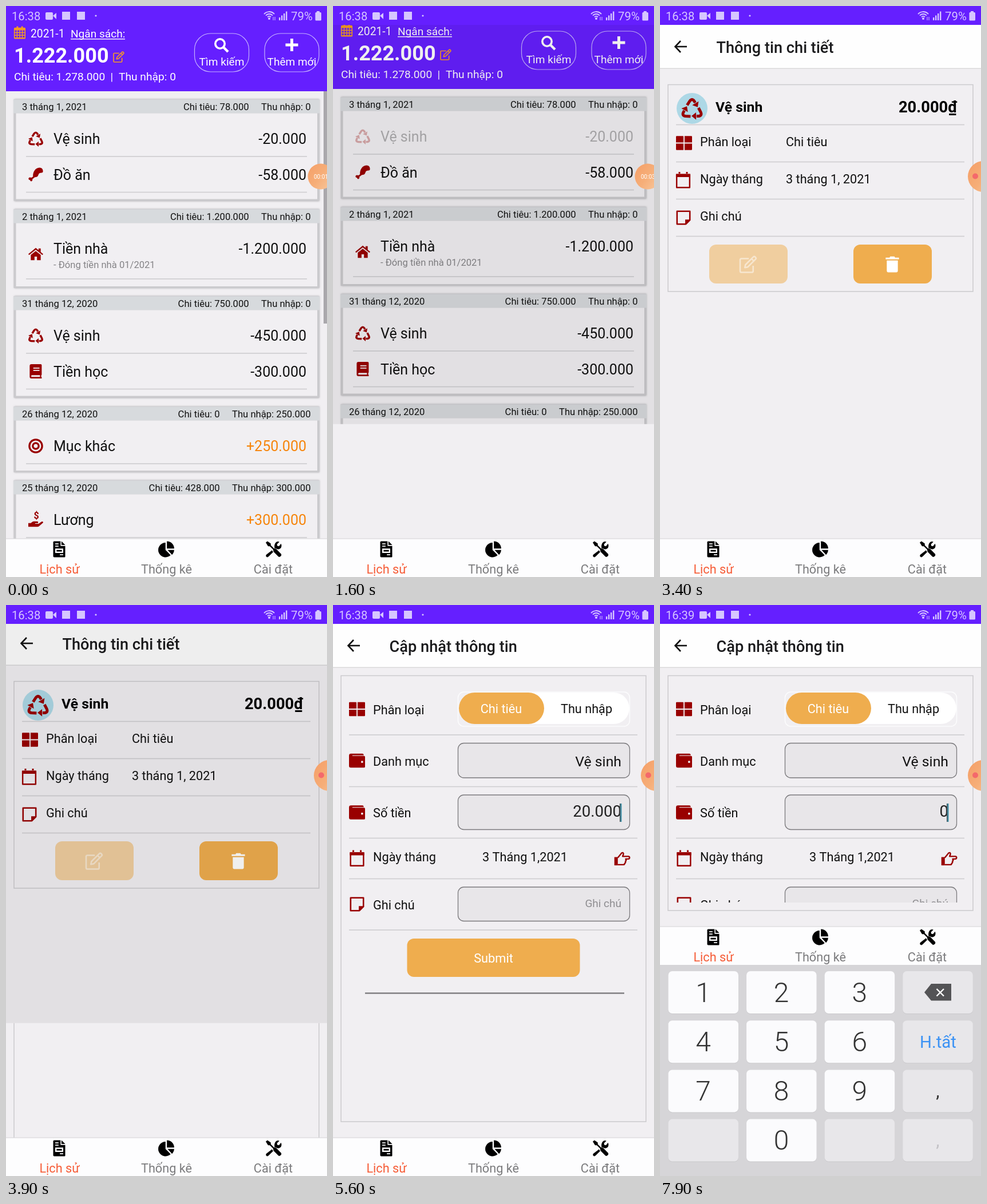
Write an HTML page with a canvas that moves like this. It is 561 px wide and 998 px high and loops after 8000 ms.

```html
<!DOCTYPE html>
<html lang="vi">
<head>
<meta charset="utf-8">
<title>Sổ chi tiêu</title>
<style>
html, body { margin: 0; width: 100%; height: 100%; overflow: hidden; background: #f1eff2; }
canvas { display: block; width: 100vw; height: 100vh; }
</style>
</head>
<body>
<canvas id="stage"></canvas>
<script>
const W = 561, H = 998, LOOP = 8000;
const BAR = 33, SCREEN_H = 898, KEYS_H = 369;
const BG = '#f1eff2', PURPLE = '#651fff', RED = '#990000', ORANGE = '#efad4e', LINE = '#cecdd0', LILAC = '#d6c6ff';

const canvas = document.getElementById('stage');
const c = canvas.getContext('2d');
const scale = window.devicePixelRatio || 1;
canvas.width = W * scale;
canvas.height = H * scale;

// Icons on a 24-unit grid: [filled path, stroked path, stroke width]
const arm = (a, b, d) => ({ a, b, d });
const ICONS = {
  drumstick: ['M7.6 15.4C7 9 11 1 18 1C22 1 24 4 23.6 7.5C23 9.6 20.6 9 18.6 9.6C15.6 10.6 17 14.6 13.4 16C11.6 16.7 10.2 16.2 9.4 17.2L6.6 19.4C7.4 22 5 24 3.4 22.4C3 22 2.9 21.4 2.8 21C.6 21 -.4 18.6 1 17.4C2.2 16.4 3.6 16.6 4.6 17.4Z'],
  home: ['M12 1.6L16.5 5.4V2.6H20V8.2L24 11.6L22.7 13.2L12 4.7L1.3 13.2L0 11.6ZM12 6.6L20 13V21.4H14V15.6H10V21.4H4V13Z'],
  book: ['M5 .5H20Q21.6 .5 21.6 2V17Q21.6 18 20.8 18.4V21.2H21.6V23.5H5Q2.2 23.5 2.2 20.5V3.5Q2.2 .5 5 .5ZM8 6V7.6H18V6ZM8 9.6V11.2H18V9.6ZM6 18.2Q4.6 18.2 4.6 19.6Q4.6 21 6 21H18.8V18.2Z'],
  target: ['', 'M1.7 12A10.3 10.3 0 1 0 22.3 12A10.3 10.3 0 1 0 1.7 12ZM7.2 12A4.8 4.8 0 1 0 16.8 12A4.8 4.8 0 1 0 7.2 12Z', 3],
  hand: ['M0 17.2H4L6.4 15.4Q7.6 14.6 9 14.6H14.6Q16.4 15 15.8 16.8Q15.4 17.6 14.4 17.6H11V18.4H16.4L21 15.2Q23 14.2 24 16Q24 16.8 23.2 17.4L17 22.6Q16.2 23.2 15 23.2H0Z'],
  file: ['M4.5 0H14V7H21V23Q21 24 20 24H4.5Q3 24 3 22.5V1.5Q3 0 4.5 0ZM15.4 0L21 5.6H15.4ZM6 3.2V4.8H11V3.2ZM6 6.6V8.2H11V6.6ZM6 11V17.5H18V11ZM8 13H16V15.5H8ZM13 19.5V21H18V19.5Z'],
  pie: ['M11 13L18.4 20.4A10.5 10.5 0 1 1 11 2.5ZM13 11V.5A10.5 10.5 0 0 1 23.5 11ZM14 13H23.5A10.5 10.5 0 0 1 20.4 20Z'],
  tools: ['M0 2L2.5 0L7.5 3.4V6L12.2 10.8L15.4 11.4L23 19Q24 20.6 22.8 22L21.4 23.2Q20 24 18.6 22.8L11.6 15.6L11 12.4L6 7.5H3.4ZM22.8 3.6Q25 8 21.6 11Q18.6 13 15.5 11L13 10.4V8.4Q12.6 4.6 15.4 1.6Q17.6 -.2 20.4 .9L16.8 4.6L17.3 7.1L19.8 7.4ZM9.4 13.4L1 20Q-.6 22 1 23.4Q2.6 24.6 4.2 23L11 16.2Z'],
  month: ['M3 2.5H6V0H9V2.5H15V0H18V2.5H21Q23 2.5 23 4.5V22Q23 24 21 24H3Q1 24 1 22V4.5Q1 2.5 3 2.5Z'],
  day: ['M5.4 0H7.8V4H5.4ZM16.2 0H18.6V4H16.2ZM1.6 2.8H22.4V7.4H1.6Z', 'M2.6 4H21.4V22.6H2.6Z', 2],
  note: ['M14.6 22.6V14.8H22.4Z', 'M2.4 2.4H21.6V15.6L15.6 21.6H2.4Z', 2.2],
  wallet: ['M3 1.5H20Q22 1.5 22 4H5V5H22.5Q24 5 24 6.6V21Q24 22.6 22.4 22.6H2.6Q0 22.6 0 20V4.4Q0 1.5 3 1.5ZM19.6 12.3A1.6 1.6 0 1 0 19.6 15.5A1.6 1.6 0 1 0 19.6 12.3Z'],
  grid: ['M1 1.6H10.4Q11.2 1.6 11.2 2.4V11.2H0V2.6Q0 1.6 1 1.6ZM12.8 1.6H23Q24 1.6 24 2.6V11.2H12.8ZM0 12.8H11.2V22.4H1Q0 22.4 0 21.4ZM12.8 12.8H24V21.4Q24 22.4 23 22.4H12.8Z'],
  edit: ['', 'M13 4.2H3Q1.2 4.2 1.2 6V21Q1.2 22.8 3 22.8H17Q18.8 22.8 18.8 21V14M8.4 12.6L19 2Q20.3 .8 21.8 2.2Q23.4 3.8 22.2 5L11.6 15.6L7.6 16.4ZM16.6 4.4L19.8 7.6', 2],
  trash: ['M2.4 2.2H8L9 .6H15L16 2.2H21.6V4.8H2.4ZM4 6.4H20V21.2Q20 23.6 17.8 23.6H6.2Q4 23.6 4 21.2Z'],
  point: ['M1 10H6V22H1Z', 'M6 11L11.5 4.2Q13.6 2.6 14.2 5.4L13 9H21.2Q23 9.2 23 10.8Q23 12.6 21.2 12.7H17.4Q18.8 15 17 16.2Q17.6 18.2 16 19Q16 21 13.6 21H6', 2]
};
for (const k in ICONS) {
  const [f, s, w] = ICONS[k];
  ICONS[k] = { fill: f && new Path2D(f), line: s && new Path2D(s), w };
}

function icon(name, x, y, size, color) {
  const i = ICONS[name];
  c.save();
  c.translate(x, y);
  c.scale(size / 24, size / 24);
  c.translate(-12, -12);
  c.fillStyle = c.strokeStyle = color;
  c.lineJoin = 'round';
  if (i.fill) c.fill(i.fill, 'evenodd');
  if (i.line) { c.lineWidth = i.w; c.stroke(i.line); }
  c.restore();
}

function recycle(x, y, size) {
  c.save();
  c.translate(x, y);
  c.scale(size / 24, size / 24);
  c.translate(0, 1.6);
  c.fillStyle = c.strokeStyle = RED;
  c.lineWidth = 3.2;
  for (let k = 0; k < 3; k++) {
    c.beginPath();
    c.moveTo(-5.6, -5.2);
    c.lineTo(-2.6, -9.9);
    c.quadraticCurveTo(0, -13.4, 2.5, -9.9);
    c.lineTo(3.6, -8);
    c.stroke();
    c.beginPath();
    c.moveTo(7.4, -9.6);
    c.lineTo(6.4, -3);
    c.lineTo(.2, -5.4);
    c.fill();
    c.rotate(Math.PI * 2 / 3);
  }
  c.restore();
}

function text(s, x, y, size, color = '#111', align = 'left', weight = 400) {
  c.font = `${weight} ${size}px Roboto, sans-serif`;
  c.textAlign = align;
  c.fillStyle = color;
  c.fillText(s, x, y);
}
function rect(x, y, w, h, color) { c.fillStyle = color; c.fillRect(x, y, w, h); }
function round(x, y, w, h, r, fill, line, lw = 1.3) {
  c.beginPath();
  c.roundRect(x, y, w, h, r);
  if (fill) { c.fillStyle = fill; c.fill(); }
  if (line) { c.strokeStyle = line; c.lineWidth = lw; c.stroke(); }
}
function disc(x, y, r, color) {
  c.beginPath();
  c.arc(x, y, r, 0, 7);
  c.fillStyle = color;
  c.fill();
}
function path(points, color, lw) {
  c.beginPath();
  points.forEach(([x, y]) => c.lineTo(x, y));
  c.strokeStyle = color;
  c.lineWidth = lw;
  c.stroke();
}
const rule = (x, y, w, color = LINE, h = 1.6) => rect(x, y - h / 2, w, h, color);

function statusBar(t) {
  rect(0, 0, W, BAR, PURPLE);
  text(t < 6800 ? '16:38' : '16:39', 10, 25, 20.2, LILAC);
  round(69, 11, 13, 13, 2, LILAC);
  c.beginPath(); c.moveTo(82, 17); c.lineTo(88, 12); c.lineTo(88, 23); c.fill();
  rect(98, 10, 14, 14, LILAC);
  rect(124, 10, 14, 14, LILAC);
  disc(157, 17, 1.6, LILAC);
  c.strokeStyle = LILAC;
  c.lineWidth = 1.8;
  [4, 8, 12].forEach(r => {
    c.beginPath();
    c.arc(460, 22, r, -Math.PI * .77, -Math.PI * .23);
    c.stroke();
  });
  disc(460, 22, 2, LILAC);
  path([[467, 25], [467, 19]], LILAC, 1);
  path([[470, 19], [470, 25]], LILAC, 1);
  for (let i = 0; i < 4; i++) rect(477 + i * 4, 20 - i * 3.5, 2.4, 5 + i * 3.5, LILAC);
  text('79%', 498, 25, 20.4, LILAC);
  rect(543, 9, 5, 2, LILAC);
  round(540.5, 11, 10.5, 14.5, 1.5, LILAC);
}

function tabBar(y) {
  rect(0, y, W, 67, '#fdfdfe');
  rect(0, y - .5, W, 1.2, '#dad9dc');
  icon('file', 93, y + 18.5, 28, '#000');
  icon('pie', 280, y + 18.5, 29, '#000');
  icon('tools', 468, y + 18.5, 28, '#000');
  text('Lịch sử', 93.5, y + 61, 21.7, '#f65c37', 'center');
  text('Thống kê', 280.5, y + 61, 21.7, '#7b7b7d', 'center');
  text('Cài đặt', 467, y + 61, 21.7, '#7b7b7d', 'center');
}

const DAYS = [
  { y: 162, day: '3 tháng 1, 2021', out: '78.000', inc: '0', rows: [['recycle', 'Vệ sinh', '-20.000'], ['drumstick', 'Đồ ăn', '-58.000']] },
  { y: 354, day: '2 tháng 1, 2021', out: '1.200.000', inc: '0', rows: [['home', 'Tiền nhà', '-1.200.000', '- Đóng tiền nhà 01/2021']] },
  { y: 506, day: '31 tháng 12, 2020', out: '750.000', inc: '0', rows: [['recycle', 'Vệ sinh', '-450.000'], ['book', 'Tiền học', '-300.000']] },
  { y: 699, day: '26 tháng 12, 2020', out: '0', inc: '250.000', rows: [['target', 'Mục khác', '+250.000']] },
  { y: 828, day: '25 tháng 12, 2020', out: '428.000', inc: '300.000', rows: [['hand', 'Lương', '+300.000']] }
];

function dayCard(d, alpha) {
  const note = d.rows[0][3];
  const h = note ? 140 : 117 + (d.rows.length - 1) * 62.5;
  c.save();
  c.shadowColor = '#aaa9ac';
  c.shadowBlur = 3 * scale;
  rect(13.5, d.y + 1, 534, h - 2, '#cbcacd');
  c.restore();
  rect(13, d.y + 1.5, 535, 24, '#d7dadd');
  rect(17.5, d.y + 25.5, 526.5, h - 29.5, BG);
  text(d.day, 28, d.y + 19.5, 16.6);
  text('Thu nhập: ' + d.inc, 532.5, d.y + 19.5, 16.6, '#111', 'right');
  const gap = c.measureText('Thu nhập: ' + d.inc).width + 21.5;
  text('Chi tiêu: ' + d.out, 532.5 - gap, d.y + 19.5, 16.6, '#111', 'right');
  d.rows.forEach(([pic, name, sum, memo], i) => {
    const y = d.y + i * 62.5;
    c.globalAlpha = i ? 1 : alpha;
    if (pic === 'recycle') recycle(52, y + 70, 26);
    else icon(pic, 52, y + (memo ? 80 : 70), 26, RED);
    if (pic === 'hand') text('$', 53, y + 68, 16, RED, 'center', 700);
    text(name, 83, y + 79, 25);
    text(sum, 525, y + 79, 25, sum[0] === '+' ? '#f6850c' : '#111', 'right');
    if (memo) text(memo, 83, y + 104, 16.6, '#858487');
    c.globalAlpha = 1;
    rule(35, y + (memo ? 123 : 101), 491);
  });
}

function topButton(x, label) {
  round(x, 48, 95, 67, 28, null, '#c5b1ff', 1.2);
  text(label, x + 47.5, 103.5, 19.1, '#fff', 'center');
}

function listScreen(t) {
  rect(0, 0, W, H, BG);
  rect(0, 0, W, 149, PURPLE);
  icon('month', 24, 46.5, 22, '#f59a23');
  for (let r = 0; r < 3; r++)
    for (let k = 0; k < 4; k++) rect(15.5 + k * 4.6, 42.5 + r * 4.7, 3.2, 3.2, PURPLE);
  text('2021-1', 43, 55, 19.3, '#fff');
  text('Ngân sách:', 113, 55, 19.1, '#fff');
  rect(113, 57, 95, 1.4, '#fff');
  text('1.222.000', 14, 99, 36, '#fff', 'left', 700);
  icon('edit', 197, 89, 20, '#f59a23');
  text('Chi tiêu: 1.278.000', 14, 130, 19.2, '#fff');
  text('|', 182.5, 130, 19.2, '#fff');
  text('Thu nhập: 0', 197, 130, 19.2, '#fff');
  topButton(329.5, 'Tìm kiếm');
  topButton(452, 'Thêm mới');
  c.beginPath();
  c.arc(374, 66, 8.2, 0, 7);
  c.strokeStyle = '#fff';
  c.lineWidth = 3.6;
  c.stroke();
  path([[380, 72], [388, 80]], '#fff', 4.4);
  rect(488.5, 65.5, 22, 5, '#fff');
  rect(497, 57, 5, 22, '#fff');

  const press = t < 1000 ? 1 : t < 1100 ? .55 : .3;
  DAYS.forEach((d, i) => dayCard(d, i ? 1 : press));
  c.globalAlpha = Math.max(0, 1 - t / 900);
  rect(555, 149, 6, 406, '#aaa8ac');
  c.globalAlpha = 1;
}

function titleBar(title) {
  rect(0, 0, W, H, BG);
  rect(0, 0, W, 109, '#fefefe');
  rect(0, 108.5, W, 1.5, '#d9d8da');
  path([[47, 71], [27, 71]], '#111', 2.6);
  path([[36, 61], [26.5, 71], [36, 81]], '#111', 2.6);
  text(title, 98.5, 81.5, 27.2, '#1b1b1d', 'left', 500);
}

function detailScreen(t) {
  titleBar('Thông tin chi tiết');
  round(14, 137.5, 533, 361.5, 0, null, '#cbcacd', 1.5);
  disc(56, 179, 27, '#add8e6');
  recycle(56, 179, 37);
  text('Vệ sinh', 97, 185, 24.8, '#000', 'left', 700);
  text('20.000₫', 519, 186, 27.3, '#000', 'right', 700);
  [207.5, 272.5, 337.5, 402.5].forEach(y => rule(28, y, 504));
  icon('grid', 42, 239.5, 28, RED);
  icon('day', 40.5, 304.5, 29, RED);
  icon('note', 41, 370, 28, RED);
  text('Phân loại', 70, 245, 21.7);
  text('Chi tiêu', 220, 245, 21.7);
  text('Ngày tháng', 70, 310, 21.7);
  text('3 tháng 1, 2021', 220, 310, 21.7);
  text('Ghi chú', 70, 375, 21.7);
  c.globalAlpha = t < 3000 ? 1 : .5;
  round(86, 417, 137, 68, 12, ORANGE);
  icon('edit', 154, 451.5, 31, '#fff');
  c.globalAlpha = 1;
  round(338, 417, 137, 68, 12, ORANGE);
  icon('trash', 406, 451.5, 29, '#fff');
}

function amount(t) {
  const steps = [[6600, '20.000'], [6900, '2.000'], [7100, '200'], [7500, '20'], [7700, '2']];
  const s = steps.find(([end]) => t < end);
  return s ? s[1] : '0';
}

function field(y, h) { round(218.5, y, 300, h, 10, '#e8e6e9', '#7b7a7d'); }

function editScreen(t, foot = 0) {
  titleBar('Cập nhật thông tin');
  round(14, 123.5, 533, 779.5 - foot, 0, null, '#cbcacd', 1.5);
  c.save();
  c.beginPath();
  c.rect(0, 124, W, 765 - foot);
  c.clip();
  icon('grid', 42, 182, 28, RED);
  text('Phân loại', 70, 190.5, 21.7);
  round(218.5, 152, 300, 60, 10, null, '#fcfcfd', 1.5);
  round(220, 153, 298, 55, 27.5, '#fff');
  round(220, 153, 149, 55, 27.5, ORANGE);
  text('Chi tiêu', 294, 189, 21.7, '#fff', 'center');
  text('Thu nhập', 443, 189, 21.7, '#111', 'center');
  [227, 317.5, 407.5, 478.5, 568].forEach(y => rule(28, y, 504));
  icon('wallet', 42, 272, 28, RED);
  text('Danh mục', 70, 280.5, 21.7);
  field(241.5, 60.5);
  text('Vệ sinh', 504, 282, 24.8, '#111', 'right');
  icon('wallet', 42, 362.5, 28, RED);
  text('Số tiền', 70, 371, 21.7);
  field(332, 60.5);
  text(amount(t), 504, 370, 27.6, '#222', 'right');
  if ((t >= 5600 && t < 6000) || t >= 6500) {
    rect(501, 347, 2, 32, '#4a5a60');
    rect(502.5, 347, 2, 32, '#3c8fa8');
  }
  icon('day', 42, 443, 29, RED);
  text('Ngày tháng', 70, 448, 21.7);
  text('3 Tháng 1,2021', 261, 448, 21.7);
  icon('point', 505, 443, 29, RED);
  icon('note', 42, 523, 28, RED);
  text('Ghi chú', 70, 531.5, 21.7);
  field(493, 59.5);
  text('Ghi chú', 504, 528, 19, '#8f8e91', 'right');
  round(129.5, 583, 302, 67, 12, ORANGE);
  text('Submit', 280.5, 625, 21.8, '#fff', 'center');
  rule(56, 678.5, 453, '#7c7b7e', 2.4);
  c.restore();
}

function keyboard(t, top) {
  c.save();
  c.translate(0, top - 629);
  rect(0, 629, W, KEYS_H, '#d6d5d8');
  const pressed = t >= 7300 && t < 7900 && t % 200 === 100;
  for (let r = 0; r < 4; r++) {
    for (let k = 0; k < 4; k++) {
      const x = 14.5 + k * 136.6, y = 640 + r * 86.2;
      const digit = k < 3 && r < 3 ? String(r * 3 + k + 1) : r === 3 && k === 1 ? '0' : '';
      const fill = digit ? '#fbfbfd' : pressed && !r ? '#d0cfd4' : '#e8e7ea';
      round(x, y + 1, 122.5, 74, 7, '#cac9cc');
      round(x, y, 122.5, 74, 7, fill);
      if (digit) text(digit, x + 61, y + 53.5, 48, '#333', 'center', 300);
    }
  }
  c.beginPath();
  [[462, 677], [474, 662], [509, 662], [509, 691.5], [474, 691.5]].forEach(([x, y]) => c.lineTo(x, y));
  c.fillStyle = '#545456';
  c.fill();
  path([[483.5, 671], [496, 683.5]], '#fff', 2.4);
  path([[496, 671], [483.5, 683.5]], '#fff', 2.4);
  text('H.tất', 486, 773.5, 29.4, '#3b92f4', 'center');
  text(',', 485.5, 860, 32, '#333', 'center');
  text(',', 485.5, 946, 32, '#c3c2c6', 'center');
  c.restore();
}

function bubble(t) {
  const hide = t < 3300 ? 0 : t < 3400 ? .5 : 1;
  const x = 550 + 15 * hide, r = 22.5 + 4.5 * hide;
  const g = c.createLinearGradient(x - r, 280, x + r, 315);
  g.addColorStop(0, '#f5a069');
  g.addColorStop(.5, '#f6ae78');
  g.addColorStop(1, '#f8c79c');
  disc(x, 298, r, g);
  if (hide === 1) return disc(551, 297.5, 5, '#f4696b');
  const sec = t < 400 ? 1 : t < 1400 ? 2 : t < 2500 ? 3 : 4;
  text('00:0' + sec, 538 + 10 * hide, 301.5, 10, '#fff');
}

// The next screen is uncovered from the bottom while the old one drifts up and dims
function reveal(from, to, t, p) {
  c.save();
  c.translate(0, -Math.round(18.3 * p));
  from(t);
  c.restore();
  rect(0, BAR, W, SCREEN_H, `rgba(0,0,0,${Math.min(.1, p / 3.6)})`);
  const top = p > .95 ? BAR : BAR + SCREEN_H * (1 - p);
  c.save();
  c.beginPath();
  c.rect(0, top, W, H - top);
  c.clip();
  c.translate(0, Math.round(36.8 * (1 - p)));
  to(t);
  c.restore();
}
const progress = age => [.223, .8, .973][age / 100];

function draw(t) {
  const keysUp = t >= 6000;
  if (t < 1600) listScreen(t);
  else if (t < 1900) reveal(listScreen, detailScreen, t, progress(t - 1600));
  else if (t < 3900) detailScreen(t);
  else if (t < 4200) reveal(detailScreen, editScreen, t, progress(t - 3900));
  else editScreen(t, keysUp ? KEYS_H : 0);
  tabBar(keysUp ? 931 - KEYS_H : 931);
  if (t >= 5900) keyboard(t, keysUp ? 629 : 760);
  statusBar(t);
  bubble(t);
}

const start = performance.now();
function tick() {
  const t = (performance.now() - start) % LOOP;
  c.setTransform(scale, 0, 0, scale, 0, 0);
  draw(Math.floor(t / 100) * 100);
  requestAnimationFrame(tick);
}
tick();
</script>
</body>
</html>
```
